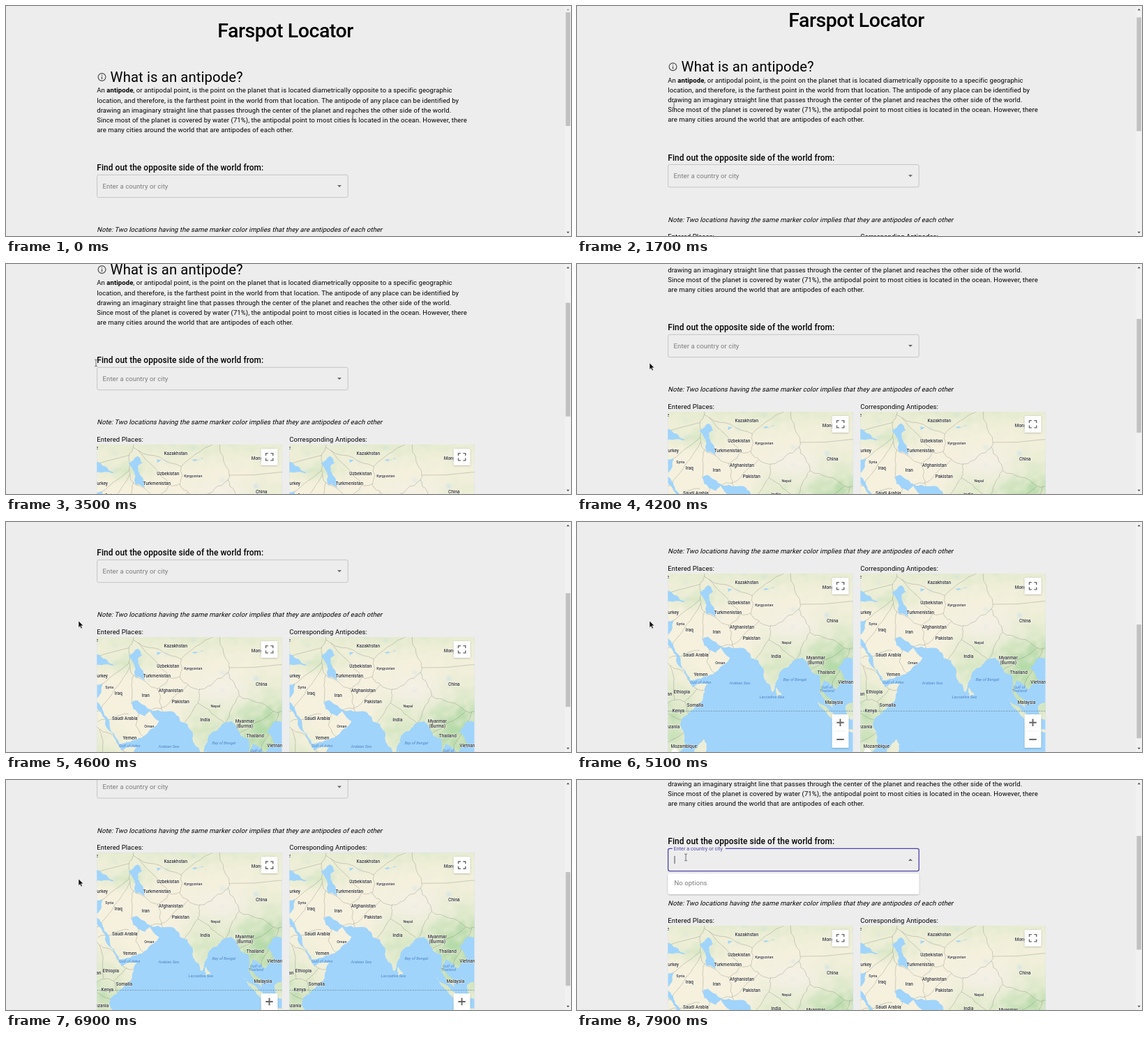
An HTML page for the animation above (8000 ms loop, 810 px wide and 330 px high).

```html
<!DOCTYPE html>
<html lang="en">
<head>
<meta charset="utf-8">
<title>Farspot Locator</title>
<style>
  html, body { margin: 0; width: 100%; height: 100%; overflow: hidden; background: #ededed; }
  svg { display: block; width: 810px; height: 330px; font-family: Roboto, Arial, sans-serif; }
  .title { font-size: 28.46px; font-weight: 500; letter-spacing: -.0156em; text-anchor: middle; }
  .head { font-size: 20.2px; letter-spacing: .0074em; }
  .sub { font-size: 11.86px; font-weight: 500; letter-spacing: .0075em; }
  .body { font-size: 9.49px; letter-spacing: .0094em; }
  .grey { fill: #7b7b7b; }
  .place { font-size: 6.45px; font-weight: 500; fill: #333; text-anchor: middle; paint-order: stroke; stroke: #fff; stroke-opacity: .7; stroke-width: 1px; }
  .small { font-size: 5.3px; }
  .sea { font-size: 5.7px; font-weight: 400; fill: #4f82c4; font-style: italic; stroke: none; }
  .credit { font-size: 5.93px; fill: #222; }
</style>
</head>
<body>
<svg id="stage" viewBox="0 0 810 330"></svg>
<script>
const LOOP = 8000, STEP = 100, CLICK = 7700, MAX_SCROLL = 301;
const ACCENT = '#4a43ae', BG = '#ededed', WATER = '#a0d4fb';
const MAP = { w: 265.4, h: 264, top: 353, xs: [130.3, 406.3] };

const clamp = v => Math.min(1, Math.max(0, v));
const mix = (a, b, p) => a + (b - a) * p;

let seed = 7;
function rand() {
  seed = (seed * 16807) % 2147483647;
  return seed / 2147483647;
}

// Web Mercator, centred near 73°E
const project = (lon, lat) => [
  132.5 + (lon - 72.87) * 3.373,
  197 - 193.3 * Math.log(Math.tan(Math.PI / 4 + lat * Math.PI / 360)),
];
const parse = s => s.split(' ').map(p => project(...p.split(',').map(Number)));

// Midpoint displacement: turns a few key points into a ragged line
function rough(pts, depth = 3) {
  if (!depth) return pts;
  const out = [pts[0]];
  for (let i = 1; i < pts.length; i++) {
    const [[ax, ay], [bx, by]] = [pts[i - 1], pts[i]];
    const dx = bx - ax, dy = by - ay;
    const k = (rand() - .5) * Math.min(.3, 5 / Math.hypot(dx, dy));
    out.push([(ax + bx) / 2 - dy * k, (ay + by) / 2 + dx * k], pts[i]);
  }
  return rough(out, depth - 1);
}
const line = pts => 'M' + rough(pts).map(p => p.map(v => v.toFixed(1)).join(' ')).join('L');
const area = s => { const p = parse(s); return line([...p, p[0]]) + 'Z'; };

const lands = [
  '114,53 114,22 108,21 106,18 109,13 105,9 102,12 100,13 99,9 103,5 104,1 101,3 98,8 98,15 95,16 94,18 91,22 ' +
  '87,21 82,17 80,13 78,8 75,13 73,19 72,21 69,22 67,25 57,26 55,27 50,30 48,29 51,25 54,24 56,26 60,22 55,17 ' +
  '45,13 43,13 39,21 35,28 32,30 32,31 34,31 36,36 32,36 32,53',
  '32,32 33,28 37,21 43,12 44,10 51,12 48,4 39,-5 41,-15 35,-20 32,-21',
  '49,-12 50,-16 48,-21 43,-21 45,-16',
  '80,10 82,7 80,6',
  '95,6 104,-1 106,-6 104,-6 98,2',
  '105,-7 114,-8 114,-9 106,-8',
  '109,2 114,5 114,-4 110,-3',
];
const lakes = [
  '32,46 35,45 41,42 32,42',
  '47,45 51,47 53,45 51,44 54,39 54,37 50,38 50,41',
  '59,46 61,46 59,45',
  '74,46 79,46.5 75,45.6',
];
const names = {
  place: `Kazakhstan 113 12|Mongolia 235 19|Uzbekistan 102 41|Turkmenistan 86 55|China 236 67|Iraq 31 80|Iran 70 83
    |Afghanistan 106 76|Pakistan 120 92|Saudi Arabia 40 116|India 155 118|Myanmar 212 120|(Burma) 212 127
    |Yemen 47 144|Thailand 227 141|Vietnam 256 155|Ethiopia 20 169|Somalia 39 188|Malaysia 238 184|Kenya 15 196
    |Mozambique 23 247|Turkey 6 55|Tanzania 4 219|Sudan -3 172|Ukraine -9 4`,
  'place small': 'Kyrgyzstan 138 44|Syria 18 71|Nepal 170 98|Oman 75 127',
  'place sea': 'Gulf of Aden 47 155|Arabian Sea 103 156|Bay of Bengal 182 151|Gulf of 228 162|Thailand 228 167|Laccadive Sea 149 176',
};
const places = Object.entries(names).flatMap(([cls, list]) => list.split('|').map(item => {
  const [, name, x, y] = item.trim().match(/^(.+) (\S+) (\S+)$/);
  return { cls, name, x: +x, y: +y };
}));

// The stretch of the line midway between a and b that no third place is nearer to
function border(a, b, sites) {
  const mx = (a.x + b.x) / 2, my = (a.y + b.y) / 2, dx = a.y - b.y, dy = b.x - a.x;
  let lo = -5, hi = 5;
  for (const c of sites) {
    if (c === a || c === b) continue;
    const ex = c.x - a.x, ey = c.y - a.y;
    const slope = 2 * (dx * ex + dy * ey);
    const base = 2 * (mx * ex + my * ey) + a.x ** 2 + a.y ** 2 - c.x ** 2 - c.y ** 2;
    if (slope > 0) hi = Math.min(hi, -base / slope);
    else lo = Math.max(lo, -base / slope);
  }
  return lo < hi ? line([lo, hi].map(t => [mx + t * dx, my + t * dy])) : '';
}
function borders() {
  const sites = places.filter(p => !p.cls.includes('sea') && p.name[0] !== '(');
  return sites.flatMap((a, i) => sites.slice(i + 1).map(b => border(a, b, sites))).join('');
}

const bump = (x, y, cx, cy, rx, ry) => Math.exp(-(((x - cx) / rx) ** 2) - ((y - cy) / ry) ** 2);

// Soft patches: greener in the wet regions, paler on the high plateau
function terrain() {
  const cream = [246, 241, 222], green = [180, 218, 168], pale = [244, 240, 229];
  let out = '';
  for (let y = 0; y <= MAP.h; y += 8) {
    for (let x = 0; x <= MAP.w; x += 8) {
      const wet = bump(x, y, 245, 145, 55, 60) + .4 * bump(x, y, 155, 130, 25, 45) + .7 * bump(x, y, 0, 220, 45, 60)
        + .35 * bump(x, y, 130, -5, 200, 30) + .4 * bump(x, y, 40, 40, 40, 12);
      const high = bump(x, y, 180, 78, 45, 22), g = clamp(wet * (.55 + .7 * rand()));
      const rgb = cream.map((c, i) => Math.round(mix(mix(c, green[i], g), pale[i], high)));
      out += `<circle cx="${x + rand() * 6 - 3}" cy="${y + rand() * 6 - 3}" r="7" fill="rgb(${rgb})"/>`;
    }
  }
  return out;
}

const text = (cls, x, y, s, more = '') => `<text class="${cls}" x="${x}" y="${y}" ${more}>${s}</text>`;
const rect = (x, y, w, h, fill, more = '') => `<rect x="${x}" y="${y}" width="${w}" height="${h}" fill="${fill}" ${more}/>`;
const path = (d, more) => `<path d="${d}" ${more}/>`;

function mapArt() {
  const shadow = 'rx="1.2" filter="url(#soft)"';
  return `<clipPath id="frame">${rect(0, 0, MAP.w, MAP.h, '#000')}</clipPath>
    <clipPath id="land">${path(lands.map(area).join(''), '')}</clipPath>
    <g id="map" clip-path="url(#frame)">
      ${rect(0, 0, MAP.w, MAP.h, WATER)}
      <g clip-path="url(#land)">
        <g filter="url(#blur)">${terrain()}</g>
        ${path(borders(), 'fill="none" stroke="#77776f" stroke-width=".5" stroke-opacity=".65"')}
      </g>
      ${path(lakes.map(area).join(''), `fill="${WATER}"`)}
      ${path(`M0 197.3H${MAP.w}`, 'stroke="#6d8796" stroke-width=".7" stroke-dasharray="2.4 1.2"')}
      ${places.map(p => text(p.cls, p.x, p.y + 2.5, p.name)).join('')}
      ${rect(235.4, 6, 23.7, 23.7, '#fff', shadow)}
      ${path('M242.2 16v-3.4h3.4M249 12.6h3.4v3.4M252.4 19.5v3.4h-3.4M245.6 22.9h-3.4v-3.4', 'fill="none" stroke="#666" stroke-width="1.4"')}
      ${rect(235.4, 202, 23.7, 48, '#fff', shadow)}
      ${path('M239 226h16.6', 'stroke="#e6e6e6" stroke-width=".6"')}
      ${path('M242 213.7h10.4M247.2 208.5v10.4M242 238h10.4', 'stroke="#666" stroke-width="1.9"')}
      <circle cx="10" cy="256" r="5" fill="#fff"/>
      ${rect(76, 255.7, 190, 8.3, '#f5f5f5', 'fill-opacity=".75"')}
      ${text('credit', 79, 261.5, 'Keyboard shortcuts')}
      ${text('credit', 137.5, 261.5, 'Map data ©2021 Quolim, ORVEK')}
      ${text('credit', 226, 261.5, 'Terms of Use')}
    </g>`;
}

const prose = [
  'An <tspan font-weight="700">antipode</tspan>, or antipodal point, is the point on the planet that is located diametrically opposite to a specific geographic',
  'location, and therefore, is the farthest point in the world from that location. The antipode of any place can be identified by',
  'drawing an imaginary straight line that passes through the center of the planet and reaches the other side of the world.',
  'Since most of the planet is covered by water (71%), the antipodal point to most cities is located in the ocean. However, there',
  'are many cities around the world that are antipodes of each other.',
];

const stage = document.getElementById('stage');
stage.innerHTML = `
  <defs>
    <filter id="blur" x="-20%" y="-20%" width="140%" height="140%"><feGaussianBlur stdDeviation="2.2"/></filter>
    <filter id="soft" x="-20%" y="-20%" width="140%" height="150%"><feDropShadow dx="0" dy=".6" stdDeviation=".8" flood-opacity=".3"/></filter>
    ${mapArt()}
  </defs>
  ${rect(0, 0, 810, 330, BG)}
  <g id="page">
    ${text('title', 400.5, 45, 'Farspot Locator')}
    <circle cx="137.5" cy="102" r="5.4" fill="none" stroke="#444" stroke-width="1.1"/>
    ${path('M137.5 101.2v3.8M137.5 98.9v1.2', 'stroke="#444" stroke-width="1.2"')}
    ${text('head', 149.6, 109, 'What is an antipode?')}
    ${prose.map((s, i) => text('body', 130.3, 124.3 + 14.23 * i, s)).join('')}
    ${text('sub', 130.3, 236.4, 'Find out the opposite side of the world from:')}
    ${rect(130.6, 242.3, 359.6, 32.4, 'none', 'id="field" rx="2.4"')}
    ${rect(136.8, 240, 76, 4, BG, 'id="notch"')}
    ${text('body', 138.6, 261.9, 'Enter a country or city', 'id="hint"')}
    ${path('M475 257.1h6l-3 3z', 'id="arrow" fill="#666"')}
    ${text('body', 0, 0, 'Note: Two locations having the same marker color implies that they are antipodes of each other',
      'transform="translate(130.3 324.3) skewX(-14)"')}
    ${text('body', MAP.xs[0], 349, 'Entered Places:')}
    ${text('body', MAP.xs[1], 349, 'Corresponding Antipodes:')}
    ${MAP.xs.map(x => `<use href="#map" x="${x}" y="${MAP.top}"/>`).join('')}
    <g id="popup">
      ${path('M140 253v11', 'stroke="#222" stroke-width=".8"')}
      ${rect(130.4, 278, 360, 30, '#fff', 'rx="2.4" filter="url(#soft)"')}
      ${text('body grey', 139.4, 295.4, 'No options')}
    </g>
  </g>
  ${rect(801.2, 0, 8.8, 330, '#f1f1f1')}
  ${rect(802.4, 9, 6.5, 163.2, '#c1c1c1', 'id="thumb"')}
  ${path('M803.6 6.2h4.2l-2.1-2.4z', 'id="up"')}
  ${path('M803.6 323.8h4.2l-2.1 2.4z', 'id="down"')}
  ${path('M0 0v9.4l2.2-2 1.5 3.5 1.6-.7-1.5-3.4h3z', 'id="pointer" fill="#111" stroke="#fff" stroke-width=".5"')}
  ${path('M-2-5q2 0 2 1.2q0-1.2 2-1.2M0-4V4M-2 5q2 0 2-1.2q0 1.2 2 1.2', 'id="beam" fill="none" stroke="#555" stroke-width=".8"')}`;

const el = Object.fromEntries([...stage.querySelectorAll('[id]')].map(n => [n.id, n]));
const set = (node, attrs) => { for (const k in attrs) node.setAttribute(k, attrs[k]); };
const show = (node, on) => node.setAttribute('visibility', on ? 'visible' : 'hidden');

// Each move runs from one time to another and ends at a value; it rests in between
const follow = (from, moves, t) =>
  moves.reduce((v, [t0, t1, to]) => mix(v, to, clamp((t - t0) / (t1 - t0))), from);

const scrollMoves = [[1500, 2300, 59], [2600, 3300, 94], [3800, 4600, 188], [4600, 5100, 279],
  [5100, 5500, MAX_SCROLL], [6600, 7500, 144]];
const mouseX = [[700, 1500, 139], [2700, 3200, 129], [3500, 3700, 104], [7400, 7700, 156]];
const mouseY = [[700, 1500, 142], [7400, 7700, 111]];

function draw(t) {
  const scroll = follow(0, scrollMoves, t);
  const x = follow(497, mouseX, t), y = follow(158, mouseY, t);
  const open = t >= CLICK, lift = clamp((t - CLICK) / 200);

  set(el.page, { transform: `translate(0 ${-scroll})` });
  set(el.thumb, { y: 9 + scroll * .495 });
  set(el.up, { fill: scroll > 0 ? '#505050' : '#a3a3a3' });
  set(el.down, { fill: scroll < MAX_SCROLL ? '#505050' : '#a3a3a3' });

  set(el.field, { stroke: open ? ACCENT : '#bababa', 'stroke-width': open ? 1.3 : .8 });
  set(el.hint, { y: mix(261.9, 245, lift), fill: open ? ACCENT : '#7b7b7b' });
  el.hint.style.fontSize = mix(9.49, 7.12, lift) + 'px';
  set(el.arrow, { transform: open ? 'rotate(180 478 258.5)' : '' });
  show(el.notch, open);
  show(el.popup, open);

  const beam = x > 127;
  show(el.beam, beam);
  show(el.pointer, !beam);
  set(beam ? el.beam : el.pointer, { transform: `translate(${x} ${y})` });
}

const start = performance.now();
function tick() {
  const t = (performance.now() - start) % LOOP;
  draw(Math.floor(t / STEP) * STEP);
  requestAnimationFrame(tick);
}
tick();
</script>
</body>
</html>
```
